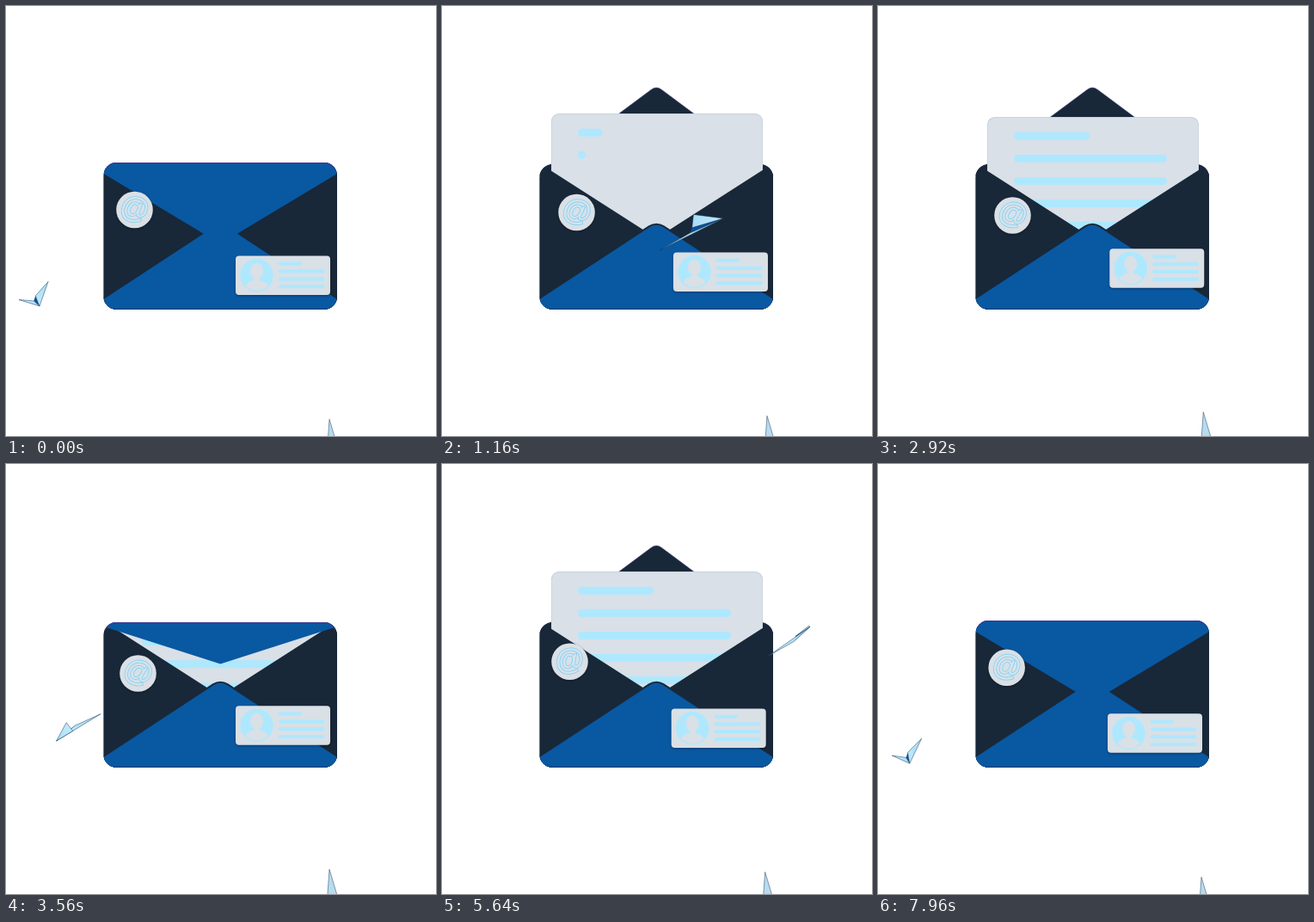
Write an HTML page with a canvas that moves like this. It is 500 by 500 pixels and loops after 8000 ms.

```html
<!DOCTYPE html>
<html lang="en">
<head>
<meta charset="utf-8">
<title>Envelope and paper plane</title>
<style>
html, body { margin: 0; width: 100%; height: 100%; overflow: hidden; background: #fff; }
canvas { display: block; width: 500px; height: 500px; }
</style>
</head>
<body>
<canvas id="stage" width="500" height="500"></canvas>
<script>
const ctx = document.getElementById('stage').getContext('2d');
const LOOP = 8000, HALF = 4000, STEP = 40;
const DARK = '#182839', BLUE = '#0958a2', PAPER = '#d9e0e7', SKY = '#aee8ff', EDGE = '#3b3a94';
const LEFT = 113.5, RIGHT = 385, MID = 249.3, BOTTOM = 353, CORNER = 15;

// Waypoints of the floating parts: time, badge centre, card corner
const drift = [
  [0, 149.5, 237, 267, 290.5],
  [520, 154, 239, 266, 288],
  [1960, 158, 241, 272, 285],
  [3560, 153.5, 243.5, 267, 281.3],
  [4720, 140.5, 233, 266.5, 286.5],
  [6800, 160, 229, 267, 282]
];

const clamp = v => Math.max(0, Math.min(1, v));
const ease = v => (1 - Math.cos(Math.PI * clamp(v))) / 2;

// Smooth closed curve through the waypoints
function floatAt(t) {
  const n = drift.length;
  const key = i => drift[(i + n) % n];
  const time = i => key(i)[0] + LOOP * Math.floor(i / n);
  let i = n - 1;
  while (drift[i][0] > t) i--;
  const d = time(i + 1) - time(i), u = (t - time(i)) / d;
  const slope = (j, c) => (key(j + 1)[c] - key(j - 1)[c]) / (time(j + 1) - time(j - 1)) * d;
  return [1, 2, 3, 4].map(c => {
    const a = key(i)[c], b = key(i + 1)[c];
    const blend = u * u * (3 - 2 * u);
    return a + (b - a) * blend + u * (1 - u) * ((1 - u) * slope(i, c) - u * slope(i + 1, c));
  });
}

function box(x, y, w, h, r, fill) {
  ctx.beginPath();
  ctx.roundRect(x, y, w, h, r);
  ctx.fillStyle = fill;
  ctx.fill();
}

function disc(x, y, r, fill) {
  ctx.beginPath();
  ctx.arc(x, y, r, 0, 2 * Math.PI);
  ctx.fillStyle = fill;
  ctx.fill();
}

function poly(points, fill, line) {
  ctx.beginPath();
  points.forEach(p => ctx.lineTo(p[0], p[1]));
  ctx.closePath();
  ctx.fillStyle = fill;
  ctx.fill();
  if (line) {
    ctx.strokeStyle = line;
    ctx.lineWidth = 0.7;
    ctx.lineJoin = 'round';
    ctx.stroke();
  }
}

function withShadow(draw) {
  ctx.save();
  ctx.shadowColor = 'rgba(0,0,0,0.35)';
  ctx.shadowBlur = 3;
  ctx.shadowOffsetY = 1;
  draw();
  ctx.restore();
}

function bodyPath(top) {
  ctx.beginPath();
  ctx.roundRect(LEFT, top, RIGHT - LEFT, BOTTOM - top, CORNER);
}

// -1 fully open, 1 fully closed
function flapState(t) {
  if (t < 2000) return 1 - 2 * ease((t - 227) / 366);
  return 2 * ease((t - 3309) / 375) - 1;
}

function drawOpenFlap(s) {
  const tip = 187 + 94.3 * s, side = 191.5;
  ctx.beginPath();
  ctx.moveTo(RIGHT, side + 5);
  ctx.lineTo(RIGHT - 3, side);
  ctx.arcTo(MID, tip, LEFT + 3, side, 10);
  ctx.lineTo(LEFT + 3, side);
  ctx.lineTo(LEFT, side + 5);
  ctx.closePath();
  ctx.fillStyle = DARK;
  ctx.fill();
  ctx.strokeStyle = 'rgba(50,45,120,0.6)';
  ctx.lineWidth = 0.8;
  ctx.stroke();
}

function drawClosedFlap(s, top) {
  const tip = 187 + 89.5 * s, side = 187 + 8 * s * s;
  ctx.save();
  bodyPath(top);
  ctx.clip();
  poly([[LEFT, top], [RIGHT, top], [RIGHT, side], [MID, tip], [LEFT, side]], BLUE);
  ctx.beginPath();
  ctx.rect(LEFT, top, RIGHT - LEFT, 9);
  ctx.clip();
  bodyPath(top);
  ctx.strokeStyle = EDGE;
  ctx.lineWidth = 2;
  ctx.stroke();
  ctx.restore();
}

function drawLetter(t) {
  const out = t < 2000 ? ease((t - 490) / 600) : 1 - ease((t - 2820) / 600);
  const y = 184.5 - 59.5 * out;
  box(127, y, 246, 150, 9, '#c3ccd5');
  box(127.5, y + 0.8, 245, 150, 9, PAPER);
  for (let i = 0; i < 5; i++) {
    const grow = ease((t - 1060 - i * 90) / 260);
    if (grow > 0) box(158, y + 17.7 + i * 26.1, Math.max(9, (i ? 178 : 88) * grow), 9, 4.5, SKY);
  }
}

function drawPocket(top) {
  ctx.save();
  bodyPath(top);
  ctx.clip();
  poly([[LEFT, 183], [MID, 270], [RIGHT, 183], [RIGHT, BOTTOM], [LEFT, BOTTOM]], DARK);
  ctx.beginPath();
  ctx.moveTo(LEFT, 341);
  ctx.arcTo(MID, 252, RIGHT, 341, 14);
  ctx.lineTo(RIGHT, 341);
  ctx.lineTo(RIGHT, BOTTOM);
  ctx.lineTo(LEFT, BOTTOM);
  ctx.closePath();
  ctx.strokeStyle = DARK;
  ctx.lineWidth = 4;
  ctx.stroke();
  ctx.fillStyle = BLUE;
  ctx.fill();
  ctx.fillStyle = 'rgba(10,40,85,0.55)';
  ctx.fillRect(LEFT, BOTTOM - 1.2, RIGHT - LEFT, 1.2);
  ctx.restore();
}

function drawBadge(x, y) {
  withShadow(() => disc(x, y, 21.3, '#dae0e5'));
  ctx.save();
  ctx.translate(x, y);
  ctx.rotate((y - 232) * 0.028);
  ctx.font = 'bold 34px "Liberation Sans", Arial, sans-serif';
  ctx.textAlign = 'center';
  ctx.textBaseline = 'alphabetic';
  ctx.lineJoin = 'round';
  ctx.strokeStyle = '#7fcff3';
  ctx.lineWidth = 1.6;
  ctx.strokeText('@', 0, 8.8);
  ctx.fillStyle = '#d3e4ee';
  ctx.fillText('@', 0, 8.8);
  ctx.restore();
}

function drawCard(x, y) {
  ctx.save();
  ctx.translate(x, y);
  poly([[109, 190], [106.5, 225], [119.5, 225]], '#b7dbef', 'rgba(40,70,95,0.75)');
  withShadow(() => box(0, 0, 110, 45.5, 4, '#d9e0e6'));
  disc(24.5, 22.7, 19.2, SKY);
  ctx.beginPath();
  ctx.ellipse(24.5, 17.5, 7.6, 9.3, 0, 0, 2 * Math.PI);
  ctx.fillStyle = '#d9e0e6';
  ctx.fill();
  ctx.fillRect(21, 23, 7, 9);
  ctx.beginPath();
  ctx.moveTo(11.5, 35);
  ctx.quadraticCurveTo(13, 30, 21, 28.5);
  ctx.lineTo(28, 28.5);
  ctx.quadraticCurveTo(36, 30, 37.5, 35);
  ctx.quadraticCurveTo(24.5, 46, 11.5, 35);
  ctx.fill();
  for (let i = 0; i < 4; i++) box(50, 7.3 + i * 8.8, i ? 53.5 : 27, 4, 1.5, SKY);
  ctx.restore();
}

// The plane circles the envelope: its centre, heading and span each swing once per lap
function drawPlane(angle) {
  const cos = Math.cos(angle), sin = Math.sin(angle);
  const swing = (mean, c, s) => mean + c * cos + s * sin;
  const x = swing(238, -206, -17), y = swing(255, 76, 28);
  const ahead = [swing(0, 7, 58), swing(4.5, 13.5, -18)];
  const span = [swing(43, -9, -6), swing(-23.5, 2.5, -18)];
  const at = (f, w) => [x + f * ahead[0] + w * span[0], y + f * ahead[1] + w * span[1]];

  const nose = at(1, 0), fold = at(0.33, 0);
  const keel = [fold[0] - 2, fold[1] + 6];
  const wing = (tip, root, a, b) => {
    const g = ctx.createLinearGradient(tip[0], tip[1], nose[0], nose[1]);
    g.addColorStop(0, a);
    g.addColorStop(1, b);
    poly([tip, nose, root], g, 'rgba(20,50,80,0.7)');
  };
  poly([nose, fold, keel], '#0c4f9c');
  wing(at(0, 0.5), fold, '#a6dcf7', '#c3ecfd');
  wing(at(0, -0.5), keel, '#c6eafa', '#a8dffa');
}

function render(time) {
  const t = time % HALF;
  const s = flapState(t);
  const top = 184 - 2 * clamp((s - 0.55) / 0.45);
  const angle = 2 * Math.PI * t / HALF;
  const behind = Math.sin(angle) < -0.15;
  const [badgeX, badgeY, cardX, cardY] = floatAt(time);

  ctx.fillStyle = '#fff';
  ctx.fillRect(0, 0, 500, 500);
  if (behind) drawPlane(angle);
  bodyPath(top);
  ctx.fillStyle = DARK;
  ctx.fill();
  if (s <= 0) drawOpenFlap(s);
  drawLetter(t);
  drawPocket(top);
  if (s > 0) drawClosedFlap(s, top);
  drawBadge(badgeX, badgeY);
  drawCard(cardX, cardY);
  if (!behind) drawPlane(angle);
}

const start = performance.now();
function tick() {
  const time = (performance.now() - start) % LOOP;
  render(Math.floor(time / STEP) * STEP);
  requestAnimationFrame(tick);
}
tick();
</script>
</body>
</html>
```
